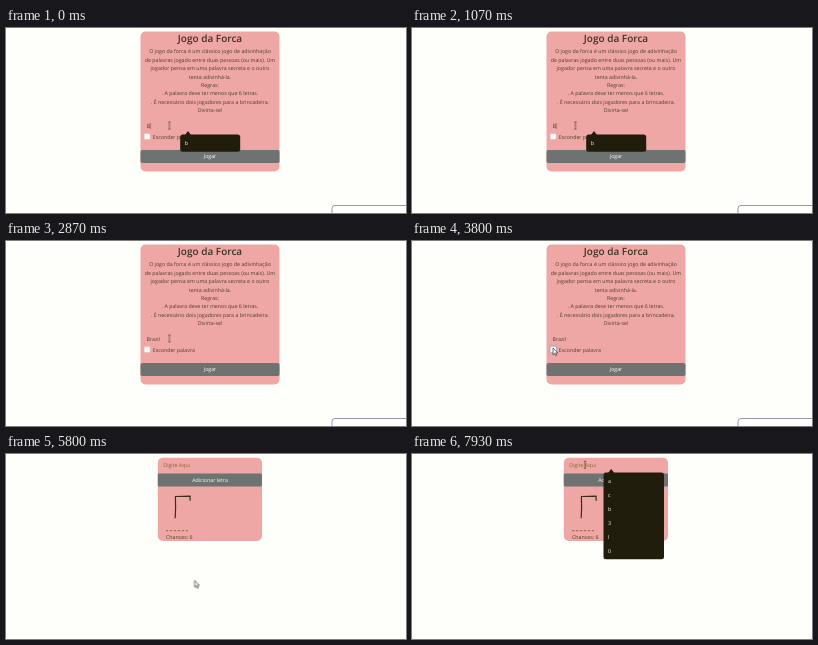
Animation, 400 px wide and 185 px high, one loop 8000 ms. Source, as an HTML page:

```html
<!DOCTYPE html>
<html lang="pt-BR">
<head>
<meta charset="utf-8">
<title>Jogo da Forca</title>
<style>
  html, body { margin: 0; width: 100%; height: 100%; overflow: hidden; background: #fefefb; }
  svg { display: block; width: 400px; height: 185px; }
  text { font: 5.28px "Open Sans", "Noto Sans", sans-serif; fill: #4f3f25; text-rendering: geometricPrecision; white-space: pre; }
  .mid { text-anchor: middle; }
  .title { font-size: 10px; font-weight: 600; fill: #3d3420; }
  .card { fill: #eea7a4; }
  .btn { fill: #6e7371; }
  .light { fill: #fffff4; }
  .hint { fill: #8c6532; }
  .menu { fill: #201d0c; }
  .ink { fill: none; stroke: #3d2d14; stroke-width: 1.2; stroke-linejoin: round; }
  .caret { stroke: #4f3f25; stroke-width: .6; }
</style>
</head>
<body>
<svg viewBox="0 0 400 185">
  <path id="corner" d="M326 186V180.500q0-3 3-3H401V186" fill="#fff" stroke="#8c8ca8" stroke-width=".9"/>

  <g id="start">
    <rect class="card" x="134.500" y="3.500" width="139" height="140" rx="5"/>
    <text class="mid title" x="204" y="14.100">Jogo da Forca</text>
    <g id="rules"></g>
    <text id="word1" x="140.500" y="100">B</text>
    <text id="word2" x="140.500" y="100">Br</text>
    <text id="word3" x="140.500" y="100">Braz</text>
    <text id="word4" x="140.500" y="100">Brazil</text>
    <text id="secret" x="140.500" y="100" letter-spacing=".4">••••••</text>
    <path id="caret" class="caret" d="M0 95v6"/>
    <rect id="ring" x="137.200" y="104.500" width="8" height="8" rx="2.200" fill="#8fa3d8" opacity="0"/>
    <rect x="138.200" y="105.500" width="6" height="6" rx="1.300" fill="#fffdfb" stroke="#d5b0a8" stroke-width=".4"/>
    <g id="checked">
      <rect x="138.200" y="105.500" width="6" height="6" rx="1.300" fill="#176fe4"/>
      <path d="M139.600 108.600l1.200 1.200 2.200-2.600" fill="none" stroke="#fff" stroke-width=".9"/>
    </g>
    <text x="146.800" y="110.500">Esconder palavra</text>
    <rect class="btn" x="134.500" y="122" width="139" height="13" rx="1.800"/>
    <text class="mid light" x="204" y="130.200">Jogar</text>
    <g id="suggest">
      <path class="menu" d="M179 107l3-4 3 4z"/>
      <rect class="menu" x="174.200" y="106.500" width="60" height="17.300" rx="2.500"/>
      <text class="light" x="178.700" y="117">b</text>
    </g>
  </g>

  <g id="game">
    <rect class="card" x="151.800" y="3.800" width="104.200" height="83.200" rx="5"/>
    <text class="hint" x="157.300" y="12.500">Digite Aqui</text>
    <path id="focus" class="caret" d="M157.200 7v6"/>
    <rect class="btn" x="151.800" y="19.600" width="104.200" height="13" rx="1"/>
    <text class="mid light" x="204" y="28">Adicionar letra</text>
    <path class="ink" d="M169.200 64.300q.7-10 .2-21.800l14.700-.4v4.600"/>
    <path d="M160 76.700h22" stroke="#7b5420" stroke-width=".8" stroke-dasharray="2.300 1.640"/>
    <text x="160" y="85.200">Chances: 6</text>
    <g id="letters">
      <path class="menu" d="M196 19l3.200-4 3.200 4z"/>
      <rect class="menu" x="191.500" y="18.500" width="60.500" height="86.700" rx="2.500"/>
    </g>
  </g>

  <g id="mouse" fill="#fff" stroke="#33332b" stroke-width=".7" stroke-linejoin="round">
    <path id="beam" d="M-1.200-3.500h2.400M0-3.500v7M-1.200 3.500h2.400" fill="none" stroke="#45422f"/>
    <path id="arrow" d="M0 0V6.600L1.500 5.300 2.500 7.700 3.700 7.200 2.700 4.900H4.700Z"/>
    <path id="hand" d="M-.8.700a.8.800 0 0 1 1.600 0V3l1.900.5q1 .3.900 1.300l-.5 2.700H-.3L-2.300 4.600q.3-1.100 1.500 0Z"/>
  </g>
</svg>
<script>
const LOOP = 8000;
const FADE = 130;
const $ = id => document.getElementById(id);

function addText(parent, content, x, y, cls) {
  const t = document.createElementNS("http://www.w3.org/2000/svg", "text");
  t.setAttribute("x", x);
  t.setAttribute("y", y);
  t.setAttribute("class", cls);
  t.textContent = content;
  $(parent).append(t);
}

[
  "O jogo da forca é um clássico jogo de adivinhação",
  "de palavras jogado entre duas pessoas (ou mais). Um",
  "jogador pensa em uma palavra secreta e o outro",
  "tenta adivinhá-la.",
  "Regras:",
  ". A palavra deve ter menos que 6 letras.",
  ". É necessário dois jogadores para a brincadeira.",
  "Divirta-se!"
].forEach((line, i) => addText("rules", line, 204, 25.4 + i * 8.4, "mid"));

[..."acb3l0"].forEach((c, i) => addText("letters", c, 196, 29.4 + i * 13.85, "light"));

function play(id, frames) {
  $(id).animate(frames, { duration: LOOP, iterations: Infinity });
}

const key = (time, opacity, easing = "step-end") => ({ offset: time / LOOP, opacity, easing });

// Visible only during the given [from, to] spans, in ms.
function show(id, ...spans) {
  const frames = spans[0][0] > 0 ? [key(0, 0)] : [];
  for (const [from, to] of spans) {
    frames.push(key(from, 1), key(to, to === LOOP ? 1 : 0));
  }
  if (frames[frames.length - 1].offset < 1) frames.push(key(LOOP, 0));
  play(id, frames);
}

function fade(id, start, from, to) {
  play(id, [key(0, from), key(start, from, "linear"), key(start + FADE, to), key(LOOP, to)]);
}

// Steps are [ms, x, y].
function move(id, steps, easing) {
  play(id, steps.map(([time, x, y]) => ({
    offset: time / LOOP, transform: `translate(${x}px, ${y}px)`, easing
  })));
}

show("start", [0, 5670]);
show("game", [5670, LOOP]);
show("corner", [0, 4600]);
show("word1", [0, 1800]);
show("word2", [1800, 2070]);
show("word3", [2070, 2330]);
show("word4", [2330, 4470]);
show("secret", [4470, 5670]);
show("ring", [3670, 5670]);
show("checked", [4470, 5670]);
show("caret", [0, 2870], [3400, 3670]);
show("focus", [7200, 7730]);
show("beam", [0, 3000], [6200, LOOP]);
show("arrow", [3000, 5270], [5670, 6200]);
show("hand", [5270, 5670]);

fade("suggest", 1800, 1, 0);
fade("letters", 7200, 0, 1);

move("caret", [
  [0, 144.2, 0], [1800, 146.4, 0], [2070, 151.8, 0], [2330, 154.4, 0], [LOOP, 154.4, 0]
], "step-end");

move("mouse", [
  [0, 163.4, 97.5], [2870, 163.4, 97.5], [3130, 166.5, 112], [3530, 141, 107],
  [5000, 141, 107], [5400, 182.6, 125.8], [5670, 182.6, 125.8], [5800, 188.6, 126.5],
  [6330, 173, 10.8], [LOOP, 173, 10.8]
], "ease-in-out");
</script>
</body>
</html>
```
